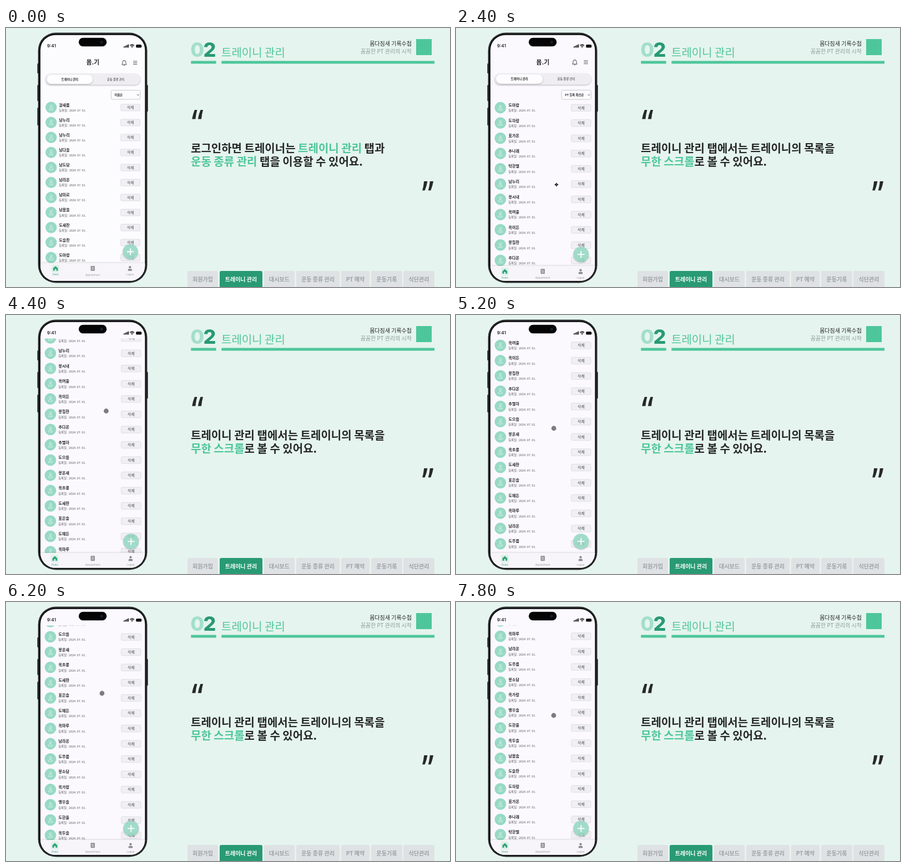
Write an HTML page that moves like this. It is 800 by 468 pixels and loops after 8000 ms.

```html
<!DOCTYPE html>
<html>
<head>
<meta charset="utf-8">
<style>
html, body { margin: 0; width: 100%; height: 100%; overflow: hidden; background: #e5f4ee; }
svg { display: block; width: 800px; height: 468px; }
text { font-family: "Noto Sans CJK KR", "Noto Sans CJK", "Noto Sans", sans-serif; fill: #262728; }
text.latin { font-family: Inter, sans-serif; }
.mint { fill: #4ec69b; }
.soft { filter: drop-shadow(0 1px 1.2px #0004); }
</style>
</head>
<body>
<svg id="stage" viewBox="0 0 800 468"></svg>
<script>
const LOOP = 8000, STEP = 200, CUT = 1400, PITCH = 27.58;
const sortedNames = '갈새롬 남누리 남누리 남다솔 남도담 남라온 남미르 남봄솔 도새찬 도슬찬 도아람'.split(' ');
const recentNames = ('도아람 도하람 표가온 추나래 탁한별 남누리 봉시내 옥여울 옥이든 봉힘찬 추다온 추별하 도으뜸 봉온새 ' +
  '옥초롱 도새찬 표은솔 도해든 옥마루 남라온 도푸름 봉소담 옥가람 맹우솔 도한울 옥두솔 남봄솔 도슬찬').split(' ');
const endlessNames = recentNames.concat(recentNames.slice(1, 9));

// y is the optical middle of the line
const text = (x, y, size, content, attrs = '') =>
  `<text x="${x}" y="${y + size * 0.37}" font-size="${size}" ${attrs}>${content}</text>`;
const rect = (x, y, w, h, r, fill, attrs = '') =>
  `<rect x="${x}" y="${y}" width="${w}" height="${h}" rx="${r}" fill="${fill}" ${attrs}/>`;
const circle = (x, y, r, fill, attrs = '') =>
  `<circle cx="${x}" cy="${y}" r="${r}" fill="${fill}" ${attrs}/>`;
const line = (d, color, width, attrs = '') =>
  `<path d="${d}" fill="none" stroke="${color}" stroke-width="${width}" ${attrs}/>`;
const BOLD = 'font-weight="700"', MID = 'text-anchor="middle"', END = 'text-anchor="end"';

const row = (name, i) => `<g transform="translate(0 ${144 + i * PITCH})">
  ${circle(80, 0, 10.4, '#98d9c4')}
  ${circle(80, -2.3, 1.9, 'none', 'stroke="#e4f6ef" stroke-width=".8"')}
  ${line('M76.6 4.3q0-3 2.3-3.6h2.2q2.3.6 2.3 3.6z', '#e4f6ef', 0.8)}
  ${text(94.4, -4.6, 7.1, name, BOLD)}
  ${text(94.4, 5.4, 5.4, '등록일 : 2024. 07. 01.', 'style="fill:#55555a"')}
  ${rect(207.7, -6, 35.3, 12.3, 1.5, '#f0eff3', 'stroke="#d9d8de" stroke-width=".8"')}
  ${text(225.4, 0, 7, '삭제', MID + ' style="fill:#4c4c52"')}
</g>`;

const appHeader = order => `
  ${text(156.5, 61.5, 11, '몸.기', BOLD + ' ' + MID)}
  ${line('M209.7 65.2h8.6l-1.2-1.8v-2.6q0-3-3.1-3t-3.1 3v2.6zM212.8 66.5q1.2 1.2 2.4 0M214 56.8v1', '#333', 0.9)}
  ${line('M230.3 59h7.4M230.3 61.8h7.4M230.3 64.6h7.4', '#444', 0.9)}
  ${rect(69.5, 82, 174, 20.6, 9.5, '#efedf1', 'class="soft"')}
  ${rect(72, 83.8, 84.5, 17, 8.5, '#fdfcfe', 'class="soft"')}
  ${text(114.3, 92.2, 5.4, '트레이니 관리', BOLD + ' ' + MID)}
  ${text(198.5, 92.2, 5.3, '운동 종류 관리', MID)}
  ${rect(190, 112.3, 53.3, 16.8, 2.5, '#fcfbfe', 'stroke="#bdbcc2" stroke-width=".8"')}
  ${text(196.3, 120.7, 5.4, order, BOLD)}
  ${line('M237.6 120l1.8 1.8 1.8-1.8', '#333', 0.9)}`;

const appFooter = `
  ${circle(225.3, 409.2, 14, '#95d8c2', 'class="soft" opacity=".88"')}
  ${line('M225.3 403v12.4M219.1 409.2h12.4', '#fff', 1.8)}
  ${rect(58, 430, 197, 40, 5, '#f7f5f9', 'style="filter:drop-shadow(0 -1px 1.5px #0002)"')}
  ${rect(81, 433, 14, 14.5, 2, '#dff0e9')}
  <path d="M88 435.6l4.4 3.8v4.6h-3v-3h-2.8v3h-3v-4.6z" fill="#2fa57d"/>
  ${rect(152.6, 435.3, 7.4, 9, 1, '#8b8a90')}
  ${line('M154.2 437.8h4.2M154.2 439.8h4.2M154.2 441.8h4.2', '#f7f5f9', 0.8)}
  ${circle(224.5, 437.6, 2.2, '#8b8a90')}
  <path d="M220.8 444.4v-2q0-1.6 1.8-1.6h3.8q1.8 0 1.8 1.6v2z" fill="#8b8a90"/>
  ${text(88, 451.2, 4.2, 'Home', 'class="latin" text-anchor="middle" style="fill:#2fa57d"')}
  ${text(156.3, 451.8, 4.4, 'Appointment', 'class="latin" text-anchor="middle" style="fill:#9a99a0"')}
  ${text(224.5, 451.2, 4.2, 'Logout', 'class="latin" text-anchor="middle" style="fill:#9a99a0"')}`;

const app = (id, order, names, bg, transform) => `<g id="${id}" clip-path="url(#screen)">
  ${rect(60, 10, 193, 450, 0, bg)}
  <g transform="${transform}">
    <g clip-path="url(#list)"><g class="content">${appHeader(order)}${names.map(row).join('')}</g></g>
    ${appFooter}
  </g></g>`;

const side = (x, y, h) => rect(x, y, 3, h, 1, '#111');
const phone = `
  ${side(56.6, 64, 18)}${side(56.6, 103, 29)}${side(56.6, 144, 32)}${side(252.6, 103, 48)}
  ${rect(57.8, 8.5, 196.6, 452, 32, '#08090a')}
  ${rect(59.2, 9.9, 193.8, 449.2, 30.6, 'none', 'stroke="#777b7c" stroke-width=".6"')}
  ${app('byName', '이름순', sortedNames, '#fcfbfd', 'translate(2.65 2) scale(.983)')}
  ${app('byDate', 'PT 등록 최신순', endlessNames, '#fbf9fe', '')}
  ${rect(131, 17.8, 50.4, 15.4, 7.7, '#050505')}${circle(172.3, 25.6, 2.6, '#16202c')}
  ${text(82, 32.4, 8, '9:41', 'class="latin" font-weight="600" text-anchor="middle"')}
  ${[0, 1, 2, 3].map(i => rect(212 + i * 2.5, 33.3 - i * 1.3, 1.7, 2.2 + i * 1.3, 0.4, '#111')).join('')}
  ${line('M223.4 31.7q3.8-3.4 7.6 0M225 33.4q2.2-1.9 4.4 0', '#111', 1.2)}${circle(227.2, 34.8, 0.9, '#111')}
  ${rect(234.2, 30, 10, 5.6, 1.6, '#111')}${rect(244.7, 31.8, 0.9, 2, 0.4, '#888')}`;

const mark = 'M339.9 148h4.5q-2.2 7.6-3 16.5h-6.2q1.4-8.2 4.7-16.5z';
const quote = `<path d="${mark}" fill="#272828"/><path d="${mark}" transform="translate(10.6 0)" fill="#272828"/>`;
const accent = s => `<tspan class="mint">${s}</tspan>`;
const message = (id, first, second) => `<g id="${id}" ${BOLD}>
  ${text(333, 217.7, 20, first)}${text(333, 241.1, 20, second)}</g>`;

const tabs = [[327, 55, '회원가입'], [385, 77, '트레이니 관리'], [465, 55, '대시보드'], [523, 78, '운동 종류 관리'],
  [604, 51, 'PT 예약'], [658, 56, '운동기록'], [716, 56, '식단관리']];
const tab = ([x, w, label], i) => rect(x, 439, w, 34, 3, i === 1 ? '#289a74' : '#dfe2e4') +
  text(x + w / 2, 453.8, 10, label, `${BOLD} ${MID} style="fill:${i === 1 ? '#fff' : '#9ba1a4'}"`);

const digit = (x, d, color) =>
  `<text class="latin" x="${x}" y="52" font-size="36" font-weight="800" ${MID} style="fill:${color}">${d}</text>`;
const slide = `
  ${digit(344.6, 0, '#a3dfca')}${digit(367, 2, '#289a74')}
  ${text(388, 44.3, 20, '트레이니 관리', 'class="mint" font-weight="500"')}
  ${rect(333.3, 59.5, 45.3, 5, 0, '#4ec69b')}${rect(388.3, 59.5, 383.7, 5, 0, '#4ec69b')}
  ${text(731, 28.3, 10, '몸다짐새 기록수첩', END + ' font-weight="500"')}
  ${text(731, 42.3, 10, '꼼꼼한 PT 관리의 시작', END + ' style="fill:#8f9c97"')}
  ${rect(739, 20, 28, 29, 0, '#4ec69b')}
  ${quote}<g transform="rotate(180 552.6 220.8)">${quote}</g>
  ${message('intro', `로그인하면 트레이너는 ${accent('트레이니 관리')} 탭과`, `${accent('운동 종류 관리')} 탭을 이용할 수 있어요.`)}
  ${message('scrolling', '트레이니 관리 탭에서는 트레이니의 목록을', `${accent('무한 스크롤')}로 볼 수 있어요.`)}
  ${tabs.map(tab).join('')}`;

const arrow = a => `<path transform="rotate(${a})" d="M0-3.6l1.7 2h-1v2h-1.4v-2h-1z"/>`;
const pointer = `<g id="pointer">
  <g id="hover" stroke="#fff" stroke-width=".5" paint-order="stroke">${[0, 90, 180, 270].map(arrow).join('')}</g>
  <g id="touch">${circle(0, 0, 9.7, '#fbf9fe', 'id="ring" stroke="#222" stroke-width="1.2"')}${circle(0, 0, 4.4, '#7e7c80')}</g></g>`;

const stage = document.getElementById('stage');
stage.innerHTML = `<defs>
  <clipPath id="screen">${rect(62, 12.7, 188.4, 444.3, 27, '#000')}</clipPath>
  <clipPath id="list">${rect(58, 42.5, 198, 420, 0, '#000')}</clipPath></defs>${slide}${phone}${pointer}`;

// time, finger x, finger y, list scroll; the finger lifts where it moves back down
const drags = [[1400, 181, 283, 0], [2400, 181, 283, 0], [3400, 186, 173, 106.6], [3600, 185, 154, 125],
  [3800, 183, 261, 125], [4400, 180.5, 173.5, 212.9], [4600, 180, 154, 232], [4800, 178, 255, 232],
  [5600, 174.5, 154.5, 332.5], [5800, 174, 245, 332.5], [6200, 173, 165, 412], [6400, 172, 259, 412],
  [6800, 171.5, 173, 498.5], [7000, 172, 150, 521], [7200, 175, 262, 521], [7800, 176, 205, 578.6], [8000, 176, 186, 597]];

function fingerAt(t) {
  const i = drags.findIndex(([end], n) => n > 0 && t <= end);
  const from = drags[i - 1], to = drags[i];
  const k = (t - from[0]) / (to[0] - from[0]);
  const [, x, y, scroll] = from.map((v, n) => v + (to[n] - v) * k);
  return { x, y, scroll, down: to[2] < from[2] };
}

const $ = id => document.getElementById(id);
const show = (id, on) => { $(id).style.display = on ? '' : 'none'; };
const list = $('byDate').querySelector('.content');

function draw(now) {
  const t = Math.floor(now % LOOP / STEP) * STEP;
  const second = t >= CUT;
  show('byName', !second);
  show('intro', !second);
  show('byDate', second);
  show('scrolling', second);
  show('pointer', second);
  if (second) {
    const f = fingerAt(t);
    list.setAttribute('transform', `translate(0 ${-f.scroll})`);
    $('pointer').setAttribute('transform', `translate(${f.x} ${f.y})`);
    show('hover', !f.down);
    show('touch', f.down);
    show('ring', t === 5600);
  }
  requestAnimationFrame(draw);
}
draw(performance.now());
</script>
</body>
</html>
```
